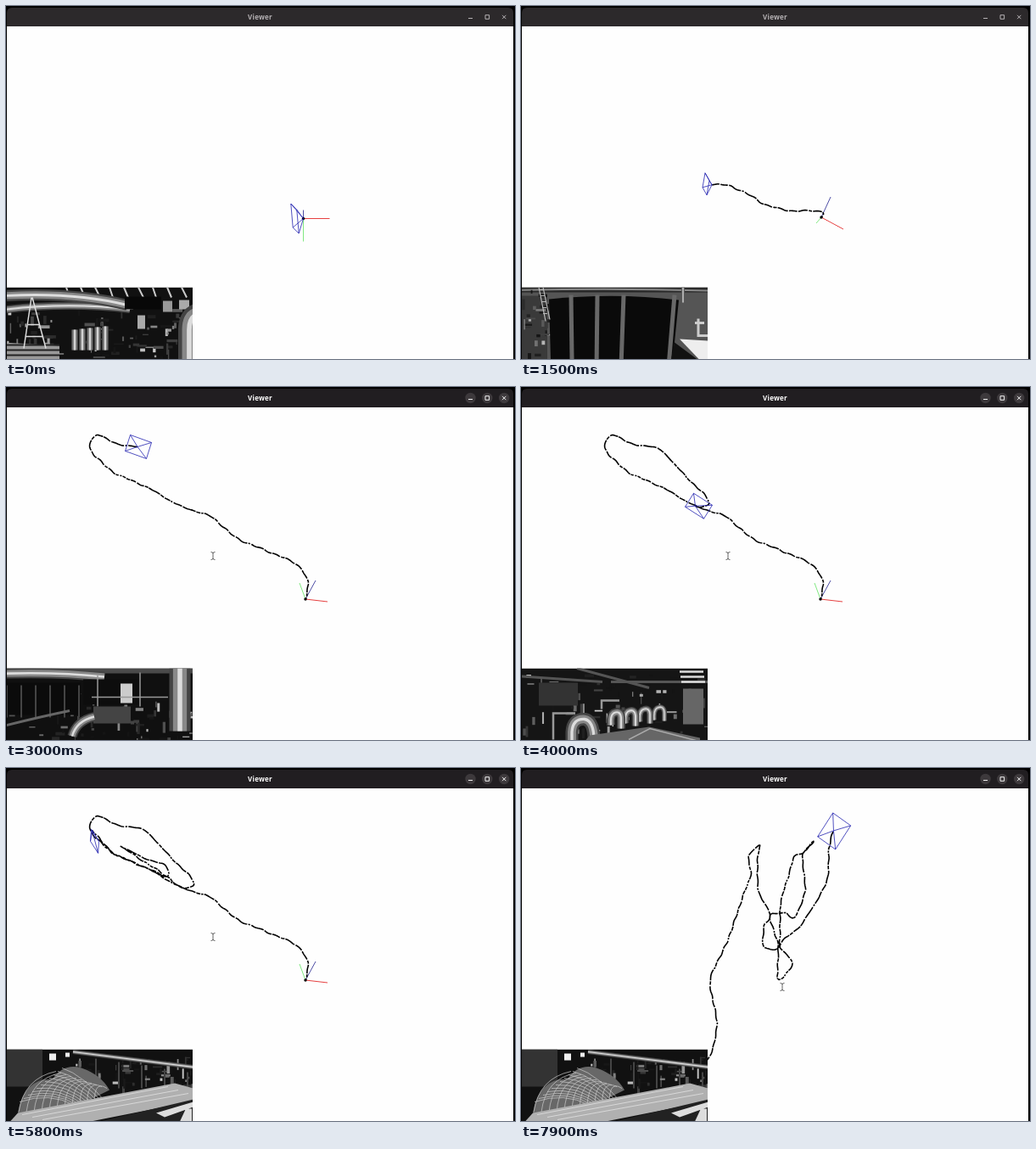
Recreate the animation shown at these times as an HTML page. Size 600 px wide and 416 px high, loop 8 s.

```html
<!DOCTYPE html>
<html lang="en">
<head>
<meta charset="utf-8">
<title>Viewer</title>
<style>
  html, body { margin: 0; width: 100%; height: 100%; overflow: hidden; background: #000; }
  svg { display: block; width: 600px; height: 416px; }
  path { fill: none; }
  #title { font: 700 8px "Noto Sans", "Open Sans", sans-serif; letter-spacing: .25px; text-anchor: middle; }
</style>
</head>
<body>
<svg viewBox="0 0 600 416">
  <defs>
    <clipPath id="feedClip"><rect width="219" height="85"/></clipPath>
    <clipPath id="viewClip"><rect x="1" y="24" width="597" height="392"/></clipPath>
  </defs>
  <path id="bar" d="M1 24V8Q1 2 7 2H592Q598 2 598 8V24Z"/>
  <text id="title" x="299.5" y="16">Viewer</text>
  <g id="discs" fill="#3d393c">
    <circle cx="547.5" cy="13" r="6.2"/><circle cx="567.3" cy="13" r="6.2"/><circle cx="587.2" cy="13" r="6.2"/>
  </g>
  <path id="icons" d="M545 14.5H550M565 10.7H569.6V15.3H565ZM585 10.8L589.4 15.2M589.4 10.8L585 15.2"/>
  <rect x="1" y="24" width="597" height="392" fill="#fefefe"/>
  <g clip-path="url(#viewClip)">
    <path id="axis0" stroke="#e64040"/>
    <path id="axis1" stroke="#80e880"/>
    <path id="axis2" stroke="#4c4ca4"/>
    <path id="trail" stroke="#000" stroke-width="1.6" stroke-linejoin="round"/>
    <circle id="start" r="1.7"/>
    <path id="frustum" stroke="#2424b0" stroke-width=".8" stroke-linejoin="round"/>
    <path id="cursor" d="M-2.5-4.5Q0-4.5 0-3Q0-4.5 2.5-4.5M0-3.5V3.5M-2.5 4.5Q0 4.5 0 3Q0 4.5 2.5 4.5" stroke="#555" stroke-width=".9"/>
  </g>
  <g id="feed" transform="translate(1 331.5)" clip-path="url(#feedClip)"></g>
</svg>
<script>
const LOOP = 8000, STEP = 100;
const el = id => document.getElementById(id);
const mix = (a, b, k) => a + (b - a) * k;
const mixAll = (p, q, k) => p.map((v, i) => mix(v, q[i], k));
const clamp = k => Math.min(1, Math.max(0, k));
const ramp = (a, b, t) => clamp((t - a) / (b - a));
const smooth = (a, b, t) => { const k = ramp(a, b, t); return k * k * (3 - 2 * k); };
const pairs = text => text.split(' ').map(p => p.split(',').map(Number));
const fmt = p => p.map(v => v.toFixed(2)).join(' ');
const times = (n, f) => Array.from({ length: n }, (_, i) => f(i));

function random(seed) {
  return () => (seed = seed * 16807 % 2147483647) / 2147483647;
}

// Rows are [time, ...values]; values are linear between rows.
function at(rows, t) {
  let i = 0;
  while (i < rows.length - 2 && t > rows[i + 1][0]) i++;
  const [a, b] = [rows[i], rows[i + 1]];
  return mixAll(a.slice(1), b.slice(1), ramp(a[0], b[0], t));
}

// Viewpoints on the same scene: axis tips, route and the waypoint reached by a given time.
const outward = pairs('353,250 356,230 344,210 317,197 272,178 242,153 205,140 166,118 126,100 99,73');
const around = pairs('108,56 132,68 155,70 170,79 193,104 219,130 220,139 205,141 190,128 135,92 160,105 188,115');
const homeward = pairs('190,128 166,118 126,100 102,73');
const views = {
  front: { axes: [[31, 0], [0, 27], [0, -10]], route: pairs('350.5,250.5 350.5,250.5'), reached: [[0, 1], [1, 1]] },
  side: {
    axes: [[26, 14], [-6, 7], [11, -24]],
    route: pairs('354,249 354,242 315,241 288,234 268,222 246,212 225,210 160,206 90,208 125,209'),
    reached: [[0, 0], [600, 1], [1500, 6], [2750, 9]]
  },
  oblique: {
    axes: [[26, 3], [-7, -19], [12, -22]],
    route: [...outward, ...around, ...homeward],
    reached: [[2750, 10], [3000, 12], [4000, 17], [5000, 20], [5800, 25]]
  },
  top: {
    axes: [[20, -14], [-10, -16], [2, -8]],
    route: pairs('185,395 222,341 231,300 223,250 243,205 262,150 271,125 268,104 282,90 279,105 280,145 294,173 287,185 286,210 304,211 306,160 316,125 322,105 333,99 346,86 332,103 335,145 322,177 312,171 293,174 303,208 303,250 320,230 305,208 330,185 360,135 363,95 368,74'),
    reached: [[0, 32], [1, 32]]
  }
};
const turns = [['front', 'side', 0, 900], ['side', 'oblique', 2750, 2950], ['oblique', 'top', 5900, 7700]];

// The camera's image plane as centre, half width and half height vectors from the apex.
const planes = [
  [0, -10, 0, 3.5, 3.5, 1.2, 14],
  [1500, -7, -1, 2.5, 4.5, -1.5, 8.5],
  [3000, 1, 0, 12.5, 4.5, -3, 9.5],
  [4000, 4, 0, 11, 7, -5, 8],
  [5000, .5, .7, 13, 2, -1, 9.7],
  [5800, 3, 13, 4.5, 7, -.5, 7],
  [7700, .7, .5, 10.5, 7.5, -9, 14]
];

function curve(route, u) {
  const i = Math.min(Math.floor(u), route.length - 2), k = u - i;
  const [p, a, b, q] = [-1, 0, 1, 2].map(n => route[Math.min(route.length - 1, Math.max(0, i + n))]);
  return a.map((v, j) => {
    const enter = .36 * (b[j] - p[j]), leave = .36 * (q[j] - v), span = b[j] - v;
    return v + k * (enter + k * (3 * span - 2 * enter - leave + k * (enter + leave - 2 * span)));
  });
}

// Evenly spaced points of a route up to a waypoint, swaying like a hand-held camera.
function sample(route, end, count = 400) {
  const steps = Math.ceil(end * 14) + 1;
  const fine = times(steps + 1, i => curve(route, end * i / steps));
  const lengths = [0];
  for (let i = 0; i < steps; i++)
    lengths.push(lengths[i] + Math.hypot(fine[i + 1][0] - fine[i][0], fine[i + 1][1] - fine[i][1]));
  let i = 0;
  return times(count + 1, n => {
    const s = lengths[steps] * n / count;
    while (i < steps - 1 && s > lengths[i + 1]) i++;
    const [x, y] = mixAll(fine[i], fine[i + 1], (s - lengths[i]) / (lengths[i + 1] - lengths[i] || 1));
    return [x + .5 * Math.sin(s * .37), y + .9 * Math.sin(s * .29) * Math.cos(s * .11)];
  });
}

function poseAt(t) {
  const [from, to, begin, end] = turns.filter(turn => t >= turn[2]).pop();
  const k = smooth(begin, end, t), [a, b] = [views[from], views[to]];
  const points = view => sample(view.route, at(view.reached, t)[0]);
  const blend = (p, q) => p.map((v, i) => mixAll(v, q[i], k));
  return { axes: blend(a.axes, b.axes), points: blend(points(a), points(b)) };
}

// Camera pictures are built from boxes, strokes, shiny tubes and seeded clutter.
const box = (color, x, y, w, h) => `<rect x="${x}" y="${y}" width="${w}" height="${h}" fill="${color}"/>`;
const stroke = (color, width, d) => `<path d="${d}" stroke="${color}" stroke-width="${width}"/>`;
const fill = (color, d) => `<path d="${d}" style="fill:${color}"/>`;
const tube = (d, w) => stroke('#444', w, d) + stroke('#888', w * .65, d) + stroke('#ddd', w * .22, d);
const repeat = (n, f) => times(n, f).join('');

function clutter(seed, n, x, y, w, h) {
  const rnd = random(seed);
  return repeat(n, () => {
    const level = Math.round(20 + 190 * rnd() ** 2.5), long = 2 + 12 * rnd(), thin = 1 + 3 * rnd();
    const size = rnd() < .5 ? [long, thin] : [thin, long];
    return box(`rgb(${level},${level},${level})`, x + w * rnd(), y + h * rnd(), ...size);
  });
}

const scenes = [
  { time: 0, pan: -.035, art:
    box('#111', -60, 0, 340, 85) + clutter(11, 110, 0, 22, 219, 62) +
    repeat(9, i => stroke('#ccc', 2, `M${70 + i * 17} 0l${4 + i % 3} 12`)) +
    tube('M-30 30Q60 16 145 26', 9) + tube('M-30 12Q70 3 142 21', 13) +
    box('#080808', 139, 11, 43, 15) + box('#999', 184, 16, 11, 13) + box('#aaa', 203, 15, 12, 11) +
    tube('M215 85V50Q215 35 225 32', 26) +
    repeat(5, i => tube(`M${80 + i * 9} ${50 - i}V74`, 8)) + box('#aaa', 154, 33, 9, 16) +
    fill('#999', 'M-20 64L62 69V85H-20Z') + repeat(3, i => stroke('#222', 2, `M-20 ${68 + i * 6}H62`)) +
    stroke('#ddd', 1.5, 'M29 12L20 72M30 12L46 72M25 44H38M22 58H42') },
  { time: 1500, pan: -.03, art:
    box('#555', -60, 0, 340, 85) + box('#2a2a2a', -60, 0, 340, 6) + stroke('#888', 2, 'M-60 5Q110-1 280 6') +
    box('#3a3a3a', -60, 10, 90, 75) + clutter(5, 25, 0, 0, 30, 85) +
    fill('#0a0a0a', 'M32 14Q110 6 185 15L178 85H34Z') +
    [58, 89, 120, 180].map(x => stroke('#686868', 5, `M${x} 9L${x - (x - 75) * .06} 85`)).join('') +
    stroke('#bbb', 1.2, 'M20 0L28 40M25 0L33 38') + repeat(5, i => stroke('#bbb', 1, `M${21 + i} ${i * 7 + 3}h5`)) +
    tube('M190 0V18', 4) + stroke('#ccc', 3, 'M204 42h11M208 37v20h12') +
    fill('#eee', 'M186 61L280 67V85H209Z') + fill('#111', 'M180 65L207 85H176Z') },
  { time: 3000, pan: .04, art:
    box('#101010', -60, 0, 340, 85) + clutter(23, 80, 0, 25, 219, 60) + box('#4a4a4a', -60, 0, 340, 6) +
    tube('M-60 9Q40 2 115 10', 12) + box('#0b0b0b', -60, 17, 147, 38) +
    repeat(6, i => stroke('#444', 2, `M${i * 17} 20V58`)) + stroke('#666', 3, 'M-20 72Q35 58 74 50') +
    box('#0d0d0d', 90, 13, 70, 30) + box('#ccc', 134, 18, 14, 23) +
    stroke('#999', 1.5, 'M100 34H190M107 8V45M157 5V45') + box('#444', 102, 45, 44, 20) +
    tube('M204 0V74', 25) + tube('M77 80Q82 62 103 57', 11) },
  { time: 4000, pan: -.04, art:
    box('#151515', -60, 0, 340, 85) + clutter(41, 80, 0, 5, 219, 70) +
    stroke('#555', 3, 'M-50 6L95 16M65 0L150 23M105 16H220') + box('#333', 20, 17, 46, 27) +
    repeat(3, i => stroke('#ddd', 2.5, `M${186 + i} ${4 + i * 6}h28`)) + box('#666', 190, 24, 24, 42) +
    repeat(4, i => tube(`M${168 - i * 17} ${62 + i * 3}V${52 + i * 2}q-1-9-9-5q-4 3-3 14`, 6 + i * 1.3)) +
    tube('M59 90V75Q60 59 74 60Q86 62 85 90', 15) + stroke('#999', 2.5, 'M37 84V53H63M94 48V38H115') +
    fill('#666', 'M80 79L150 69L210 82V85H75Z') + stroke('#aaa', 1.5, 'M126 84L151 71L205 85') },
  { time: 5000, pan: -.045, art:
    box('#0c0c0c', -60, 0, 340, 85) + clutter(67, 80, 0, 5, 130, 78) +
    repeat(6, i => box('#aaa', 66 + i % 3 * 22, 4 + (i > 2) * 8, 16, 4)) +
    box('#4c4c4c', 69, 29, 34, 25) + box('#555', 102, 23, 28, 18) +
    fill('#505050', 'M105 40H128L138 85H98Z') + stroke('#eee', 1.5, 'M124 43L131 85') +
    fill('#171717', 'M131 0H280V85H140Z') + stroke('#555', 1.5, 'M132 0L139 85M159 0L157 85M181 0L178 30M135 22L220 28') +
    fill('#222', 'M173 26L280 48V60L170 34Z') + fill('#999', 'M170 34L280 60V85H162Z') +
    repeat(4, i => tube(`M${3 + i * 17} ${75 - i * 6}V38q5-18 13-2v11`, 5)) + stroke('#444', 2, 'M-20 62H62M10 74H78') },
  { time: 5800, pan: 0, art:
    box('#111', 0, 0, 219, 85) + box('#333', 0, 0, 42, 44) + clutter(89, 70, 78, 8, 140, 38) +
    box('#eee', 50, 5, 8, 8) + box('#eee', 69, 4, 5, 5) + tube('M78 3L220 21', 5) +
    repeat(5, i => stroke('#444', 2, `M${105 + i * 27} ${11 + i * 4}V46`)) +
    fill('#686868', 'M13 75Q20 34 54 35Q67 16 88 22Q111 30 121 48L60 78Z') +
    repeat(11, i => stroke('#ccc', .7, `M${14 + i * 9} 74Q${20 + i * 8} 34 ${58 + i * 6} ${26 + i * 2}`) +
      stroke('#ccc', .7, `M${15 + i * 5} ${62 - i * 4}Q${50 + i * 4} ${50 - i * 2} ${80 + i * 4} 66`)) +
    fill('#b0b0b0', 'M13 75L198 40L220 46V61L99 85H4Z') +
    repeat(3, i => stroke('#d8d8d8', 1, `M${18 + i * 12} ${77 + i * 3}L${190 + i * 12} ${44 + i * 4}`)) +
    fill('#222', 'M110 85L220 59V85Z') + fill('#ddd', 'M176 75L220 62V68L186 80ZM204 85L211 70H218V85Z') }
];

el('feed').innerHTML = scenes.map(scene => `<g>${scene.art}</g>`).join('');
const sceneGroups = [...el('feed').children];
const dashes = random(7);
el('trail').setAttribute('stroke-dasharray', times(60, i => i % 2 ? .8 + dashes() : 2 + 16 * dashes() ** 2).join(' '));

function drawFeed(t) {
  const current = scenes.filter((s, i) => !i || t >= (s.time + scenes[i - 1].time) / 2).length - 1;
  sceneGroups.forEach((group, i) => group.style.display = i === current ? '' : 'none');
  const { time, pan } = scenes[current];
  sceneGroups[current].setAttribute('transform', `translate(${(t - time) * pan} 0)`);
}

function drawWindow(active) {
  el('bar').style.fill = active ? '#211e21' : '#2c292b';
  el('title').style.fill = active ? '#fff' : '#b5b1b4';
  el('icons').style.stroke = active ? '#f4f4f4' : '#b5b1b4';
  el('discs').style.display = el('cursor').style.display = active ? '' : 'none';
}

function drawScene(t) {
  const { axes, points } = poseAt(t);
  const origin = points[0], apex = points[points.length - 1];
  axes.forEach((tip, i) => el('axis' + i).setAttribute('d', `M${fmt(origin)}l${fmt(tip)}`));
  el('trail').setAttribute('d', 'M' + points.map(fmt).join('L'));
  el('start').setAttribute('cx', origin[0]);
  el('start').setAttribute('cy', origin[1]);

  const [cx, cy, ax, ay, bx, by] = at(planes, t);
  const quad = [[-1, -1], [1, -1], [1, 1], [-1, 1]].map(([u, v]) =>
    fmt([apex[0] + cx + u * ax + v * bx, apex[1] + cy + u * ay + v * by]));
  el('frustum').setAttribute('d', `M${quad.join('L')}Z` + quad.map(p => `M${fmt(apex)}L${p}`).join(''));

  const pointer = mixAll([244, 199], [308, 258], smooth(5900, 7500, t));
  el('cursor').setAttribute('transform', `translate(${fmt(pointer)})`);
}

function draw(now) {
  const t = Math.floor((now % LOOP) / STEP) * STEP;
  drawWindow(t >= 2800);
  drawScene(t);
  drawFeed(t);
}

const began = performance.now();
function tick() {
  draw(performance.now() - began);
  requestAnimationFrame(tick);
}
tick();
</script>
</body>
</html>
```
